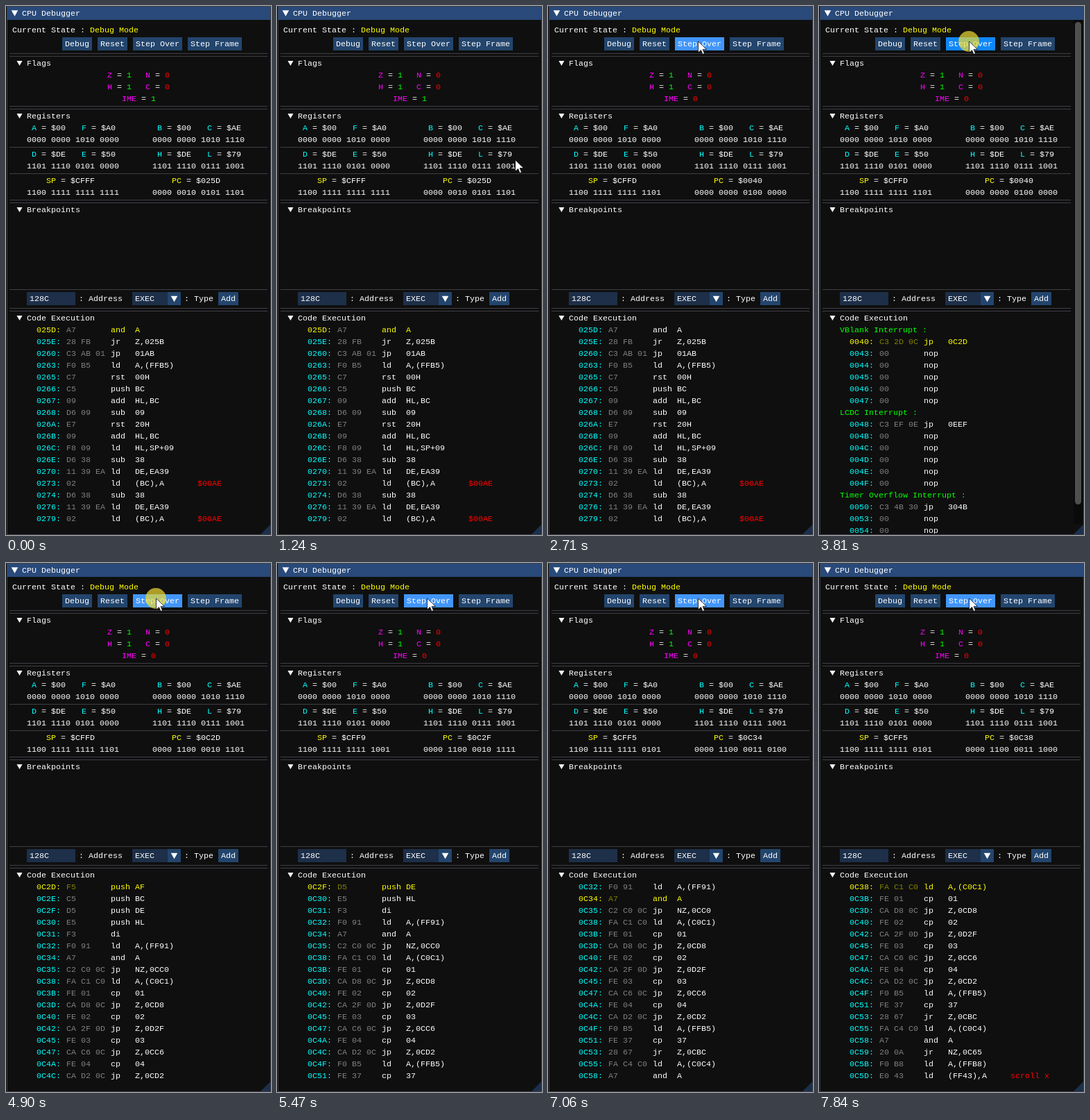
Recreate the animation shown at these times as an HTML page with a canvas. Size 382 px wide and 762 px high, loop 8 s.

```html
<!DOCTYPE html>
<html lang="en">
<head>
<meta charset="utf-8">
<title>CPU Debugger</title>
<style>
html, body { margin: 0; width: 100%; height: 100%; overflow: hidden; background: #0f0f0f; }
canvas { display: block; width: 382px; height: 762px; }
</style>
</head>
<body>
<canvas id="stage" width="382" height="762"></canvas>
<script>
const ctx = document.getElementById('stage').getContext('2d');
const LOOP = 8000, ROW = 17;
const WHITE = '#fff', YELLOW = '#ffff00', CYAN = '#00ffff', MAGENTA = '#ff00ff',
  GREEN = '#00ff00', RED = '#ff0000', GREY = '#808080', OLIVE = '#808000',
  BG = '#0f0f0f', LINE = '#3e3e47', BUTTON = '#23456d', HOVER = '#4296fa',
  ACTIVE = '#0f87fa', FRAME = '#1d2f49';

// press, button goes active, registers step, listing catches up
const clicks = [
  [2220, 2250, 2680, 2740], [3810, 3810, 3910, 3970], [4900, 4930, 5030, 5060],
  [5370, 5400, 5470, 5470], [5770, 5800, 5870, 5870], [6170, 6200, 6270, 6270],
  [6570, 6600, 6700, 6700], [6960, 6990, 7060, 7090], [7350, 7380, 7450, 7480],
  [7710, 7740, 7810, 7840]
];
const trace = ('025D CFFF,0040 CFFD,0C2D CFFD,0C2E CFFB,0C2F CFF9,0C30 CFF7,' +
  '0C31 CFF5,0C32 CFF5,0C34 CFF5,0C35 CFF5,0C38 CFF5').split(',').map(s => s.split(' '));

const hex = n => n.toString(16).toUpperCase().padStart(4, '0');
const bits = h => parseInt(h, 16).toString(2).padStart(16, '0').match(/.{4}/g).join(' ');

// Addresses follow from the length of each instruction.
function assemble(start, source) {
  let at = start;
  return source.split(';').map(line => {
    const [bytes, op, arg = '', note = ''] = line.split('|');
    const row = { addr: hex(at), bytes, op, arg, note };
    at += bytes.split(' ').length;
    return row;
  });
}

const main = assemble(0x25D,
  'A7|and|A;28 FB|jr|Z,025B;C3 AB 01|jp|01AB;F0 B5|ld|A,(FFB5);C7|rst|00H;C5|push|BC;' +
  '09|add|HL,BC;D6 09|sub|09;E7|rst|20H;09|add|HL,BC;F8 09|ld|HL,SP+09;D6 38|sub|38;' +
  '11 39 EA|ld|DE,EA39;02|ld|(BC),A|$00AE;D6 38|sub|38;11 39 EA|ld|DE,EA39;02|ld|(BC),A|$00AE');

const handler = assemble(0xC2D,
  'F5|push|AF;C5|push|BC;D5|push|DE;E5|push|HL;F3|di;F0 91|ld|A,(FF91);A7|and|A;' +
  'C2 C0 0C|jp|NZ,0CC0;FA C1 C0|ld|A,(C0C1);FE 01|cp|01;CA D8 0C|jp|Z,0CD8;FE 02|cp|02;' +
  'CA 2F 0D|jp|Z,0D2F;FE 03|cp|03;CA C6 0C|jp|Z,0CC6;FE 04|cp|04;CA D2 0C|jp|Z,0CD2;' +
  'F0 B5|ld|A,(FFB5);FE 37|cp|37;28 67|jr|Z,0CBC;FA C4 C0|ld|A,(C0C4);A7|and|A;' +
  '20 0A|jr|NZ,0C65;F0 B8|ld|A,(FFB8);E0 43|ld|(FF43),A|scroll x');

const vector = (label, start, jump) =>
  [{ label }, ...assemble(start, jump + ';00|nop'.repeat(5))];
const vectors = [
  ...vector('VBlank Interrupt :', 0x40, 'C3 2D 0C|jp|0C2D'),
  ...vector('LCDC Interrupt :', 0x48, 'C3 EF 0E|jp|0EEF'),
  ...vector('Timer Overflow Interrupt :', 0x50, 'C3 4B 30|jp|304B')
].slice(0, 18);

function listing(view) {
  if (view === 0) return main;
  if (view === 1) return vectors;
  const first = handler.findIndex(r => r.addr === trace[view][0]);
  return handler.slice(first, first + 17);
}

function box(x, y, w, h, color) {
  ctx.fillStyle = color;
  ctx.fillRect(x, y, w, h);
}

function text(s, x, top, color = WHITE) {
  ctx.fillStyle = color;
  ctx.fillText(s, x, top + 10);
}

function poly(points, color) {
  ctx.fillStyle = color;
  ctx.beginPath();
  points.forEach(([x, y]) => ctx.lineTo(x, y));
  ctx.closePath();
  ctx.fill();
}

const arrowDown = (x, y, r = 4) =>
  poly([[x - r, y - r + 0.5], [x + r, y - r + 0.5], [x, y + r - 0.5]], WHITE);

function button(label, x, y, color = BUTTON) {
  box(x, y, label.length * 7 + 8, 19, color);
  text(label, x + 4, y + 3);
}

function header(label, top) {
  arrowDown(19.5, top + 6.5);
  text(label, 30, top);
}

function pair(name, value, x, top, nameColor, valueColor = WHITE) {
  text(name, x, top, nameColor);
  const after = x + name.length * 7;
  text(' = ', after, top);
  text(value, after + 21, top, valueColor);
}

const flag = (name, value, x, top) =>
  pair(name, value, x, top, MAGENTA, value === '1' ? GREEN : RED);

function registers(top, left, right) {
  [[left, 37, 30], [right, 218, 211]].forEach(([[a, av, b, bv], x, bx]) => {
    pair(a, '$' + av, x, top, CYAN);
    pair(b, '$' + bv, x + 72, top, CYAN);
    text(bits(av + bv), bx, top + ROW);
  });
}

function codeRow(row, top, current, bytesColor) {
  if (row.label) return text(row.label, 30, top, GREEN);
  const color = current ? YELLOW : WHITE;
  text(row.addr + ':', 44, top, current ? YELLOW : CYAN);
  text(row.bytes, 87, top, current ? bytesColor : GREY);
  text(row.op, 151, top, color);
  text(row.arg, 186, top, color);
  text(row.note, 276, top, RED);
}

function pointerAt(t) {
  if (t < 1180) return null;
  if (t >= 1960) return [216, 51];
  if (t >= 1930) return [217, 56];
  const p = Math.min(1, Math.floor((t - 1180) / 30) / 15);
  const ease = Math.sin(p * Math.PI / 2);
  return [Math.round(376 - 158 * ease), Math.round(265 - 205 * ease)];
}

function pointer([x, y]) {
  const shape = [[0, 0], [0, 16], [4, 12.5], [6.5, 18.5], [9, 17.5], [6.5, 11.5], [12, 11.5]];
  poly(shape.map(([dx, dy]) => [x + dx + 0.5, y + dy]), WHITE);
  ctx.strokeStyle = '#111';
  ctx.lineWidth = 0.8;
  ctx.stroke();
}

function scrollbar() {
  box(367, 20, 13, 726, '#0a0a0a');
  ctx.fillStyle = '#4f4f4f';
  ctx.beginPath();
  ctx.roundRect(369, 23, 9, 695, 4.5);
  ctx.fill();
}

function draw(t) {
  const step = clicks.filter(c => t >= c[2]).length;
  const view = clicks.filter(c => t >= c[3]).length;
  const held = clicks.find(c => t >= c[0] && t < c[2]);
  const [pc, sp] = trace[step];
  const scrolls = view === 1;

  box(0, 0, 382, 762, BG);
  ctx.font = '11.667px "Liberation Mono", "DejaVu Sans Mono", monospace';
  box(1, 1, 380, 19, '#294a7a');
  arrowDown(12.5, 10.5, 4.8);
  text('CPU Debugger', 23, 4);

  text('Current State :', 9, 28);
  text('Debug Mode', 121, 28, YELLOW);
  button('Debug', 81, 45);
  button('Reset', 132, 45);
  button('Step Over', 183, 45, held && t >= held[1] ? ACTIVE : t >= 2220 ? HOVER : BUTTON);
  button('Step Frame', 262, 45);

  [68, 72, 144, 148, 203, 241, 279, 283, 408, 435, 439]
    .forEach(y => box(5, y, scrolls ? 358 : 372, 1, LINE));

  header('Flags', 76);
  flag('Z', '1', 146, 93);
  flag('N', '0', 201, 93);
  flag('H', '1', 146, 110);
  flag('C', '0', 201, 110);
  flag('IME', step ? '0' : '1', 167, 127);

  header('Registers', 152);
  registers(169, ['A', '00', 'F', 'A0'], ['B', '00', 'C', 'AE']);
  registers(207, ['D', 'DE', 'E', '50'], ['H', 'DE', 'L', '79']);
  pair('SP', '$' + sp, 58, 245, YELLOW);
  pair('PC', '$' + pc, 239, 245, YELLOW);
  text(bits(sp), 30, 262);
  text(bits(pc), 211, 262);

  header('Breakpoints', 287);
  box(30, 412, 70, 19, FRAME);
  text('128C', 34, 415);
  text(': Address', 105, 415);
  box(182, 412, 51, 19, FRAME);
  text('EXEC', 186, 415);
  box(233, 412, 19, 19, BUTTON);
  arrowDown(242.5, 422, 4.8);
  text(': Type', 257, 415);
  button('Add', 306, 412);

  header('Code Execution', 443);
  ctx.save();
  ctx.beginPath();
  ctx.rect(1, 443, 380, 317);
  ctx.clip();
  listing(view).forEach((row, i) =>
    codeRow(row, 460 + i * ROW, row.addr === pc, step ? OLIVE : GREY));
  ctx.restore();

  if (scrolls) scrollbar();
  poly([[381, 747], [381, 761], [367, 761]], '#1c304c');
  ctx.strokeStyle = LINE;
  ctx.lineWidth = 1;
  ctx.strokeRect(1.5, 0.5, 380, 761);

  if (held) {
    ctx.fillStyle = 'rgba(240, 220, 50, 0.7)';
    ctx.beginPath();
    ctx.arc(216, 51, 15, 0, Math.PI * 2);
    ctx.fill();
  }
  const at = pointerAt(t);
  if (at) pointer(at);
}

const begin = performance.now();
function tick() {
  draw((performance.now() - begin) % LOOP);
  requestAnimationFrame(tick);
}
tick();
</script>
</body>
</html>
```
